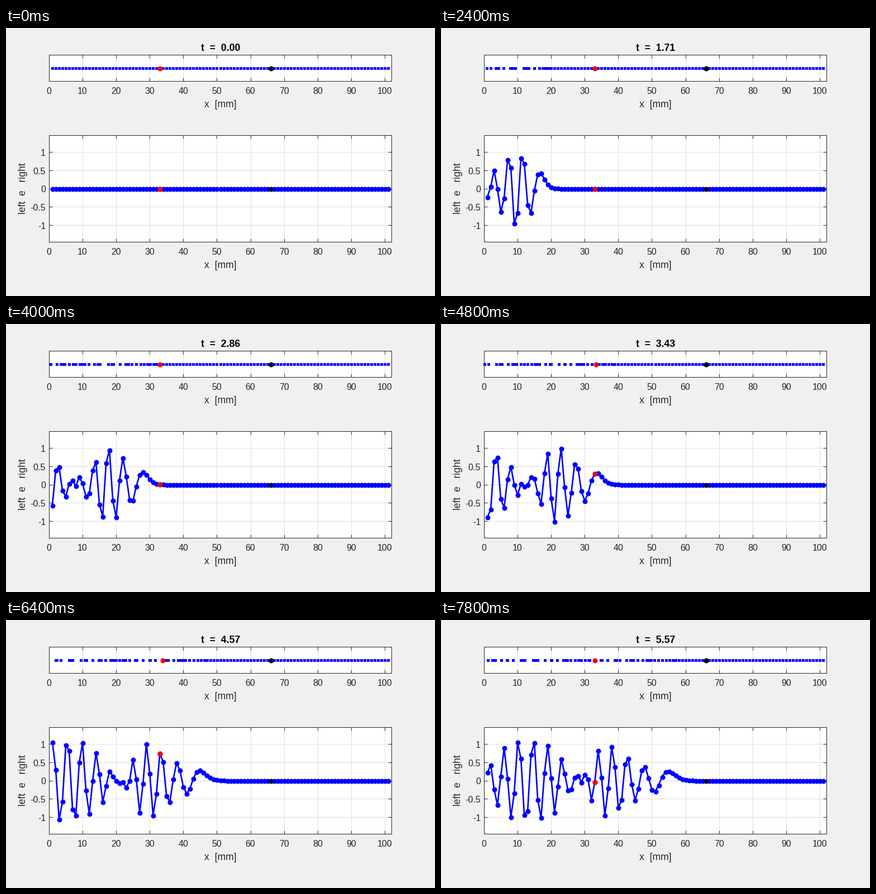
A matplotlib script that plays this animation: 768 px wide and 480 px high, repeating every 8 s.

```python
import numpy as np
import matplotlib.pyplot as plt
from matplotlib.animation import FuncAnimation
from matplotlib.markers import MarkerStyle
from matplotlib.transforms import Affine2D

W, H, DPI = 768, 480, 96
PT = 72 / DPI              # points per pixel
INK = "#262626"
LEFT, RIGHT = 77, 690
X_MAX, Y_MAX = 102, 1.464

N = 101                    # masses in the chain
FRAMES, STEPS = 40, 5      # steps of the integrator per frame
DT = 1 / 35
COURANT = 10 * DT
F1, F2, AMP = 2.0, 2.25, 0.6
RED, BLACK = 32, 65        # highlighted masses

plt.rcParams["font.family"] = "Liberation Sans"


def drive(t):
    return AMP * (np.sin(2 * np.pi * F1 * t) + np.sin(2 * np.pi * F2 * t))


def simulate(steps):
    """Leapfrog solution of the spring chain driven at its left end."""
    u = np.zeros((steps + 1, N))
    for n in range(1, steps + 1):
        now, old = u[n - 1], u[max(n - 2, 0)]
        bend = now[2:] - 2 * now[1:-1] + now[:-2]
        u[n, 1:-1] = 2 * now[1:-1] - old[1:-1] + COURANT**2 * bend
        u[n, 0] = drive((n + 1) * DT)
    return u


def make_axes(top, bottom):
    ax = fig.add_axes([LEFT / W, 1 - bottom / H,
                       (RIGHT - LEFT) / W, (bottom - top) / H])
    ax.set(xlim=(0, X_MAX), ylim=(-Y_MAX, Y_MAX), xticks=range(0, 101, 10))
    ax.tick_params(direction="in", length=6 * PT, width=PT, color=INK,
                   top=True, right=True, labelbottom=False, labelleft=False)
    for side in ax.spines.values():
        side.set(color=INK, linewidth=PT)
    ax.set_axisbelow(True)
    ax.grid(color="#dedede", linewidth=PT)
    return ax


def text(x, y, s, size=17.6, ha="center", color=INK, **kw):
    return fig.text(x / W, 1 - y / H, s, fontsize=size * PT, ha=ha,
                    va="baseline", color=color, **kw)


def label_x(bottom):
    for v in range(0, 101, 10):
        x = LEFT + v * (RIGHT - LEFT) / X_MAX
        text(x, bottom + 23.4, str(v), 16)
    text(384, bottom + 46.9, "x  [mm]")


def dots(ax, color, size, marker=None, **kw):
    # discs sit on pixel centres
    half = 0.5 / size
    disc = MarkerStyle("o", transform=Affine2D().translate(half, -half))
    kw = {"linestyle": "none", **kw}
    return ax.plot([], [], color=color, marker=marker or disc,
                   markersize=size * PT, markeredgewidth=0,
                   clip_on=False, zorder=4, **kw)[0]


fig = plt.figure(figsize=(W / DPI, H / DPI), dpi=DPI, facecolor="#f0f0f0")

strip = make_axes(48.1, 95.1)
strip.set_yticks([])
label_x(95.1)

graph = make_axes(192.1, 383.1)
graph.set_yticks([-1, -0.5, 0, 0.5, 1])
label_x(383.1)
for v in (-1, -0.5, 0, 0.5, 1):
    text(71, 288 - v * 95.5 / Y_MAX + 6.5, f"{v:g}", 16, ha="right")
text(35, 287.5, "left  e   right", rotation=90, rotation_mode="anchor")

title = text(384, 41, "", color="black", weight="bold")

chain = dots(strip, "blue", 5, "s")
chain_marks = [(RED, dots(strip, "red", 9)), (BLACK, dots(strip, "black", 9))]
wave = dots(graph, "blue", 9, linestyle="-", linewidth=2.67 * PT)
wave_marks = [(RED, dots(graph, "red", 9)), (BLACK, dots(graph, "black", 8))]

x = np.arange(1, N + 1)
history = simulate(STEPS * FRAMES)


def update(k):
    u = history[STEPS * k]
    pos = x + u
    title.set_text(f"t  =  {k * STEPS * DT:.2f}")
    chain.set_data(np.where(pos >= 0, pos, np.nan), np.zeros(N))
    wave.set_data(x, u)
    for i, mark in chain_marks:
        mark.set_data([pos[i]], [0])
    for i, mark in wave_marks:
        mark.set_data([x[i]], [u[i]])


anim = FuncAnimation(fig, update, frames=FRAMES, interval=200,
                     init_func=lambda: update(0), repeat=True)
plt.show()
```
